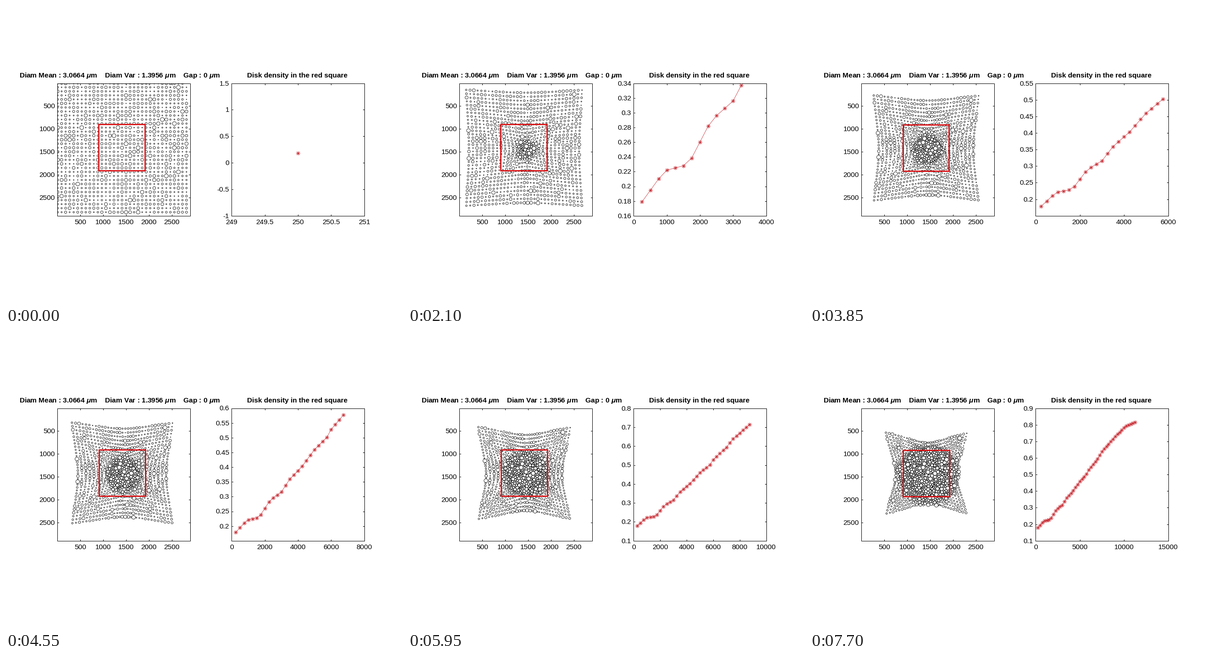
A matplotlib script for the animation above (8 s loop, 864 px wide and 648 px high).

```python
import numpy as np
import matplotlib.pyplot as plt
from matplotlib.animation import FuncAnimation
from matplotlib.collections import EllipseCollection
from matplotlib.patches import Rectangle

plt.rcParams.update({
    "font.family": "Liberation Sans",
    "font.size": 10.25,
    "mathtext.fontset": "custom",
    "mathtext.it": "Liberation Sans:italic:bold",
})

W, H, DPI = 864, 648, 108
PX = 72 / DPI                       # one pixel in points
STEPS, TICK_MS, STEP_MS, LOOP_MS = 23, 50, 350, 8000
LEFT, RIGHT, TOP, SIDE = 112.3, 492.4, 168.6, 289.2
BOTTOM = TOP + SIDE
RED, LINE_RED = "#da0c10", "#c83038"

GRID, PITCH = 33, 8.79
DIAM_MEAN, DIAM_STD = 3.9, 1.55     # pixels
SPEED, FILL = 1.71, .84             # inward pixels per sample, packing limit
CENTRE = np.array([LEFT, TOP]) + SIDE / 2

# Bends of the density curve: sample number, density
KNOTS = np.array([
    (1, .179), (3, .21), (4, .222), (6, .228), (7, .2385), (9, .282),
    (10, .296), (12, .316), (14, .359), (17, .403), (20, .46), (23, .502),
    (24, .528), (28, .5945), (30, .639), (36, .73), (41, .795), (45, .817)])


def density(sample):
    return np.interp(sample, *KNOTS.T)


def make_disks():
    rng = np.random.default_rng(12)
    shape = (DIAM_MEAN / DIAM_STD) ** 2
    diam = rng.gamma(shape, DIAM_MEAN / shape, GRID * GRID)
    row, col = np.mgrid[:GRID, :GRID] * PITCH
    pos = np.column_stack([LEFT + .2 + col.ravel(), TOP + row.ravel()])
    return pos, np.clip(diam, 1.2, 8.6) / 2


def pull_in(pos, rad):
    """Move disks to the centre at constant speed until the core is full."""
    d = pos - CENTRE
    r = np.hypot(*d.T) + 1e-9
    order = np.argsort(r)
    area = np.pi * rad[order] ** 2
    core = np.empty_like(r)
    core[order] = np.sqrt((np.cumsum(area) - area / 2) / (np.pi * FILL))
    goal = np.maximum(r - SPEED, np.minimum(r, core))
    return CENTRE + d * (goal / r)[:, None]


def separate(pos, rad, rounds=30):
    """Push overlapping disks apart."""
    x, y = pos.T.copy()
    near = ((x[:, None] - x) ** 2 + (y[:, None] - y) ** 2
            < (rad[:, None] + rad + 2.5) ** 2)
    i, j = np.nonzero(np.triu(near, 1))
    reach, n = rad[i] + rad[j], len(rad)
    for _ in range(rounds):
        dx, dy = x[i] - x[j], y[i] - y[j]
        dist = np.hypot(dx, dy) + 1e-6
        push = .4 * np.maximum(reach - dist, 0) / dist
        dx, dy = dx * push, dy * push
        x += np.bincount(i, dx, n) - np.bincount(j, dx, n)
        y += np.bincount(i, dy, n) - np.bincount(j, dy, n)
    return np.column_stack([x, y])


def simulate():
    pos, rad = make_disks()
    poses = [pos]
    for k in range(1, 2 * STEPS - 1):
        pos = separate(pull_in(pos, rad), rad)
        if k % 2 == 0:
            poses.append(pos)
    return poses, rad


def nice_scale(lo, hi, most):
    """Smallest 1-2-5 step that spans lo..hi in at most `most` intervals."""
    for e in range(-3, 5):
        for m in (1, 2, 5):
            step = m * 10.0 ** e
            a = int(np.floor(lo / step + 1e-9))
            b = int(np.ceil(hi / step - 1e-9))
            if b - a <= most:
                return a, b, step


def scales(xs, ys):
    """Limits and ticks of the density plot."""
    if len(xs) == 1:
        return (498, 502, .5), (-2, 3, .5)
    xa, xb, xstep = nice_scale(xs[0], xs[-1], 5)
    ya, yb, ystep = nice_scale(ys[0], ys[-1], 9)
    if ystep == .1:
        yb = max(yb, 8)
    return (xa, xb, xstep), (ya, yb, ystep)


def tick_path(x0, xs, ys, size=3):
    """Inward ticks on all four sides, as one broken line."""
    gap = (np.nan, np.nan)
    parts = []
    for x in xs:
        parts += [(x, TOP), (x, TOP + size), gap,
                  (x, BOTTOM), (x, BOTTOM - size), gap]
    for y in ys:
        parts += [(x0, y), (x0 + size, y), gap,
                  (x0 + SIDE, y), (x0 + SIDE - size, y), gap]
    return np.array(parts).T


fig = plt.figure(figsize=(W / DPI, H / DPI), dpi=DPI, facecolor="white")
ax = fig.add_axes([0, 0, 1, 1])
ax.set_xlim(0, W)
ax.set_ylim(H, 0)
ax.axis("off")


def frame_box(x):
    return ax.add_patch(Rectangle((x, TOP), SIDE, SIDE, fill=False,
                                  ec="black", lw=PX, zorder=2))


def label_x(x, s=""):
    return ax.text(x, BOTTOM + 18.4, s, ha="center", va="baseline")


def label_y(x0, y, s=""):
    return ax.text(x0 - 5.2, y + 4.9, s, ha="right", va="baseline")


# Left panel
poses, radii = simulate()
left_box = frame_box(LEFT)
marks = np.arange(500, 2501, 500)
offsets = marks * SIDE / 2900
for mark, off in zip(marks, offsets):
    label_x(LEFT + off, str(mark))
    label_y(LEFT, TOP + off, str(mark))
ax.plot(*tick_path(LEFT, LEFT + offsets, TOP + offsets),
        color="black", lw=PX)
disks = EllipseCollection(2 * radii, 2 * radii, np.zeros_like(radii),
                          units="xy", offsets=poses[0],
                          offset_transform=ax.transData,
                          facecolors="none", edgecolors="black", lw=.8 * PX)
ax.add_collection(disks, autolim=False)
disks.set_clip_path(left_box)
SQUARE = 100.8
square = ax.add_patch(Rectangle((0, 0), SQUARE, SQUARE, fill=False, ec=RED,
                                lw=2.7 * PX, joinstyle="miter", zorder=4))
ax.text(29, 156.2, r"Diam Mean : 3.0664 $\mu$m    "
        r"Diam Var : 1.3956 $\mu$m    Gap : 0 $\mu$m",
        weight="bold", va="baseline")

# Right panel
frame_box(RIGHT)
ax.text(RIGHT + SIDE / 2 - 1.5, 156.2, "Disk density in the red square",
        weight="bold", ha="center", va="baseline")
ticks, = ax.plot([], [], color="black", lw=PX)
curve, = ax.plot([], [], color=LINE_RED, lw=.8 * PX, marker=(8, 2, 0),
                 ms=9 * PX, mew=.8 * PX, zorder=3)
x_labels = [label_x(0) for _ in range(7)]
y_labels = [label_y(RIGHT, 0) for _ in range(11)]


def set_labels(pool, places, values, move):
    for k, text in enumerate(pool):
        shown = k < len(values)
        text.set_visible(shown)
        if shown:
            text.set_text(f"{round(values[k], 6):g}")
            move(text, places[k])


def show(step):
    disks.set_offsets(poses[step])
    # The square follows the mean position of the disks
    square.set_xy(poses[step].mean(axis=0) - SQUARE / 2 - 1)

    samples = np.arange(1, 2 * step + 2)
    xs, ys = 250 * samples, density(samples)
    (xa, xb, dx), (ya, yb, dy) = scales(xs, ys)

    def to_x(v):
        return RIGHT + SIDE * (v / dx - xa) / (xb - xa)

    def to_y(v):
        return BOTTOM - SIDE * (v / dy - ya) / (yb - ya)

    xv, yv = np.arange(xa, xb + 1) * dx, np.arange(ya, yb + 1) * dy
    if dy == .05:
        yv = yv[1:]                 # the lowest mark stays bare
    curve.set_data(to_x(xs), to_y(ys))
    ticks.set_data(*tick_path(RIGHT, to_x(xv), to_y(yv)))
    set_labels(x_labels, to_x(xv), xv, lambda t, x: t.set_x(x))
    set_labels(y_labels, to_y(yv), yv, lambda t, y: t.set_y(y + 4.9))


def update(i):
    show(min(i * TICK_MS // STEP_MS, STEPS - 1))
    return []


anim = FuncAnimation(fig, update, frames=LOOP_MS // TICK_MS,
                     interval=TICK_MS, repeat=True, repeat_delay=0)
plt.show()
```
